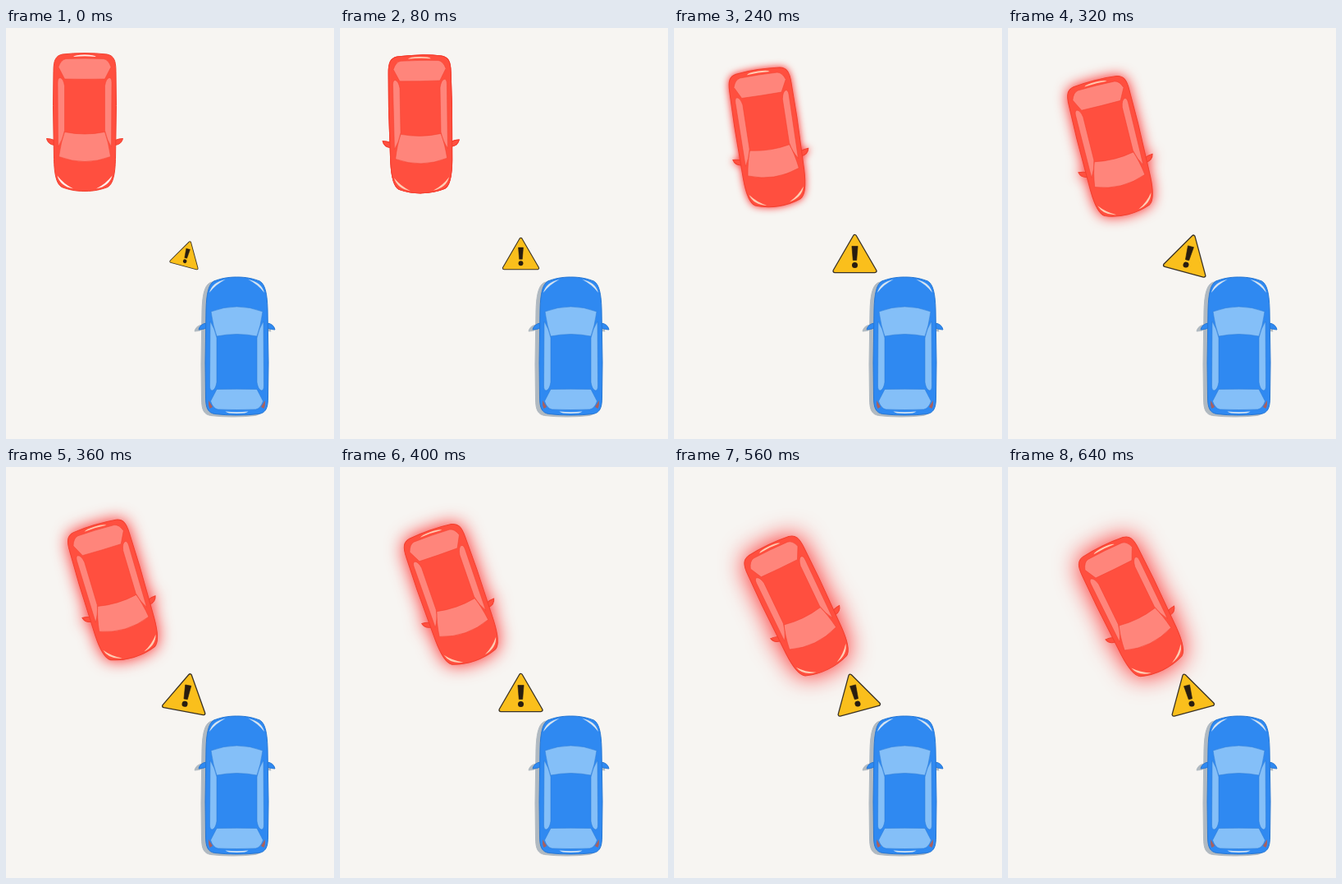
An HTML page that plays this animation: 400x500 px, repeating every 800 ms.

```html
<!DOCTYPE html>
<html lang="en">
<head>
<meta charset="utf-8">
<title>Car warning</title>
<style>
html, body { margin: 0; width: 100%; height: 100%; overflow: hidden; background: #f7f5f2; }
svg { display: block; width: 100vw; height: 100vh; }
.red { --body: #ff4f3f; --edge: #f2402f; --glass: #ff857b; --lamp: #fff0ec; --tail: #ff4f3f; }
.blue { --body: #2f89f1; --edge: #2676d2; --glass: #84bff8; --lamp: #d5e4f2; --tail: #a8605f;
  filter: drop-shadow(-4.5px 2.5px .6px rgba(70, 95, 120, .4)); }
.body { fill: var(--body); stroke: var(--edge); stroke-width: 1; }
.glass { fill: var(--glass); stroke: var(--edge); stroke-width: .5; }
.lamp { fill: var(--lamp); }
.tail { fill: var(--tail); }
</style>
</head>
<body>
<svg viewBox="0 0 400 500">
  <defs>
    <g id="side">
      <path class="body" d="M-37-28Q-45-27-46.500-20Q-42-20-37-22Z"/>
    </g>
    <g id="trim">
      <path class="glass" d="M-32.500-30Q-27-22-24.500-10V44Q-26 53-30 54Q-33 54-33 48Z"/>
      <path class="lamp" d="M-33.500-65Q-30-78-14-81Q-26-75-33.500-65Z"/>
      <path class="tail" d="M-34.500 66L-29.500 74L-33 76Q-35 72-34.500 66Z"/>
    </g>
    <g id="car">
      <use href="#side"/>
      <use href="#side" transform="scale(-1 1)"/>
      <path class="body" d="M0-84C-12-84-20-82-28-79C-35-75-37-62-37.500-45L-38.500 20L-38 62C-38 76-35 81-27 82.500Q-14 84 0 84Q14 84 27 82.500C35 81 38 76 38 62L38.500 20L37.500-45C37-62 35-75 28-79C20-82 12-84 0-84Z"/>
      <path class="glass" d="M-31.500-42Q0-54 31.500-42Q29-24 24.500-12Q0-17-24.500-12Q-29-24-31.500-42Z"/>
      <path class="glass" d="M-24.500 52.500Q0 52 24.500 52.500L32 67Q29 76 23 77Q0 78-23 77Q-29 76-32 67Z"/>
      <use href="#trim"/>
      <use href="#trim" transform="scale(-1 1)"/>
      <path class="lamp" d="M-14 79.500Q0 81 14 79.500Q12 82 0 82Q-12 82-14 79.500Z"/>
    </g>
  </defs>
  <g class="blue"><use href="#car" transform="translate(281.500 387)"/></g>
  <g class="red" id="glow"><use href="#car" id="mover"/></g>
  <g id="sign" stroke-linejoin="round">
    <path id="plate" d="M0-21.500L24.400 20.500H-24.400Z" fill="#3a3226" stroke="#3a3226" stroke-width="5.400"/>
    <path d="M0-21.500L24.400 20.500H-24.400Z" fill="#fabf1c" stroke="#fabf1c" stroke-width="2.800"/>
    <path d="M-3.600-9.500H3.600L2.200 7.500H-2.200Z" fill="#281d10" stroke="#281d10" stroke-width=".6"/>
    <circle cy="13.500" r="3.500" fill="#281d10"/>
  </g>
</svg>
<script>
const LOOP = 800, STEP = 40, DRIVE = 610, SWING = 160;
const [glow, mover, sign] = ['glow', 'mover', 'sign'].map(id => document.getElementById(id));
const ease = p => (1 - Math.cos(Math.PI * Math.min(p, 1))) / 2;

function draw(now) {
  const t = Math.floor(now % LOOP / STEP) * STEP;

  const e = ease(t / DRIVE);
  mover.setAttribute('transform',
    `translate(${96 + 56 * e} ${114.5 + 57 * e}) rotate(${180 - 26 * e})`);
  glow.style.filter = t ? `drop-shadow(0 0 ${15 * e}px #ff2020)` : 'none';
  glow.style.setProperty('--lamp', t ? '#ffcdb4' : '#fff0ec');

  // The sign pops in, swings three times and stays tilted.
  const tilt = 15 * Math.cos(Math.PI * Math.min(t / SWING, 3));
  const size = 0.67 + 0.33 * ease(t / SWING);
  sign.setAttribute('transform', `translate(220.5 275) rotate(${tilt}) scale(${size})`);

  requestAnimationFrame(draw);
}
requestAnimationFrame(draw);
</script>
</body>
</html>
```
